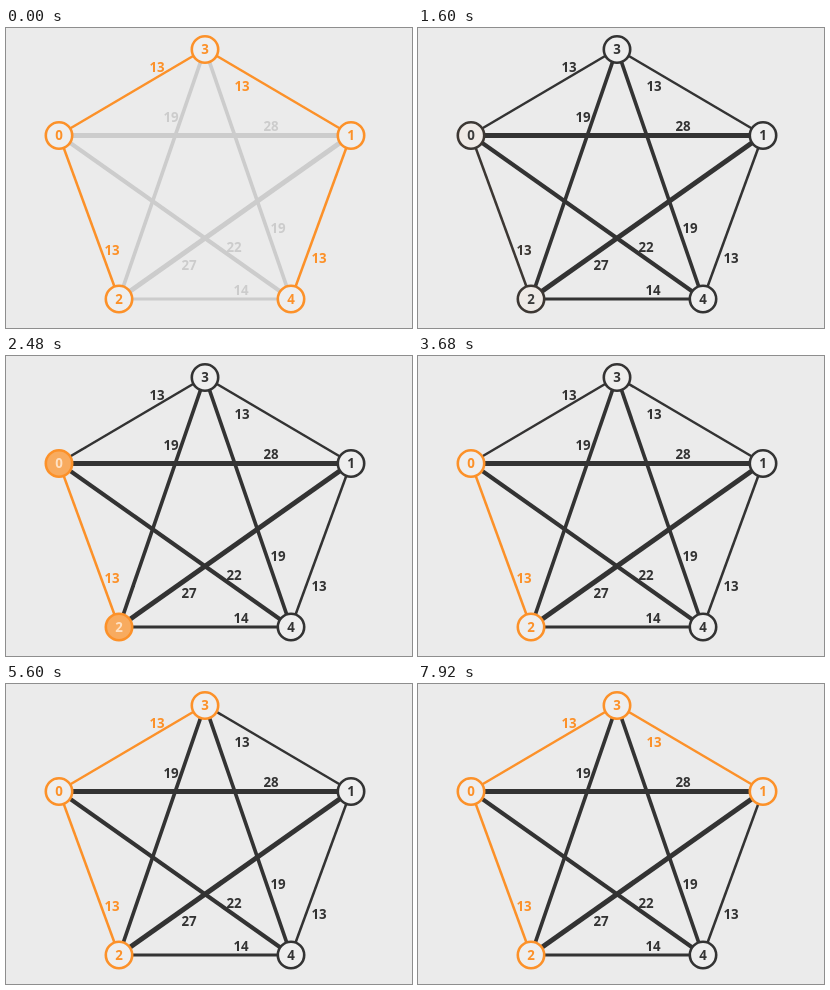
An HTML page for the animation above (8000 ms loop, 406 by 300 pixels).

```html
<!DOCTYPE html>
<html lang="en">
<head>
<meta charset="utf-8">
<title>Minimum spanning tree</title>
<style>
  @property --line { syntax: "<color>"; inherits: true; initial-value: #333; }
  @property --disc { syntax: "<color>"; inherits: true; initial-value: #eee; }
  @property --ink  { syntax: "<color>"; inherits: true; initial-value: #333; }

  :root { --hot: #fc9129; --dark: #333; --pale: #ccc; --paper: #eee; }
  html, body { margin: 0; width: 100%; height: 100%; overflow: hidden; background: #ebebeb; }
  svg { display: block; width: 406px; height: 300px; }

  line { stroke: var(--line); stroke-width: 2.5; }
  circle { r: 13.2px; fill: var(--disc); stroke: var(--line); stroke-width: 2.6; }
  text { font: bold 13.3px "Open Sans", "Noto Sans", sans-serif; text-anchor: middle; fill: var(--line); }
  .node text { fill: var(--ink); }

  .rest, .first, .second, .third, .last {
    animation: 8s cubic-bezier(.65, 0, .35, 1) infinite;
  }
  .rest   { animation-name: rest; }
  .first  { animation-name: first; }
  .second { animation-name: second; }
  .third  { animation-name: third; }
  .last   { animation-name: last; }

  /* The loop is eleven equal beats: reset, wait, then light up, settle, hold. */
  @keyframes rest {
    0% { --line: var(--pale); }
    3.25%, 100% { --line: var(--dark); }
  }
  @keyframes last {
    0% { --line: var(--hot); --disc: var(--paper); --ink: var(--hot); }
    3.25%, 100% { --line: var(--dark); --disc: var(--paper); --ink: var(--dark); }
  }
  @keyframes first {
    0% { --line: var(--hot); --disc: var(--paper); --ink: var(--hot); }
    3.25%, 18.18% { --line: var(--dark); --disc: var(--paper); --ink: var(--dark); }
    27.27% { --line: var(--hot); --disc: var(--hot); --ink: #fff; }
    36.36%, 100% { --line: var(--hot); --disc: var(--paper); --ink: var(--hot); }
  }
  @keyframes second {
    0% { --line: var(--hot); --disc: var(--paper); --ink: var(--hot); }
    3.25%, 45.45% { --line: var(--dark); --disc: var(--paper); --ink: var(--dark); }
    54.55% { --line: var(--hot); --disc: var(--hot); --ink: #fff; }
    63.64%, 100% { --line: var(--hot); --disc: var(--paper); --ink: var(--hot); }
  }
  @keyframes third {
    0% { --line: var(--hot); --disc: var(--paper); --ink: var(--hot); }
    3.25%, 72.73% { --line: var(--dark); --disc: var(--paper); --ink: var(--dark); }
    81.82% { --line: var(--hot); --disc: var(--hot); --ink: #fff; }
    90.91%, 100% { --line: var(--hot); --disc: var(--paper); --ink: var(--hot); }
  }
</style>
</head>
<body>
<svg viewBox="0 0 406 300">
  <g class="rest">
    <line x1="53" y1="107.5" x2="345" y2="107.5" style="stroke-width:5"/>
    <line x1="345" y1="107" x2="113" y2="271" style="stroke-width:5"/>
    <line x1="53" y1="107" x2="285" y2="271" style="stroke-width:4"/>
    <line x1="199" y1="21" x2="113" y2="271" style="stroke-width:3.7"/>
    <line x1="199" y1="21" x2="285" y2="271" style="stroke-width:3.7"/>
    <line x1="113" y1="271" x2="285" y2="271" style="stroke-width:2.8"/>
    <text x="265" y="103">28</text>
    <text x="183" y="242">27</text>
    <text x="228" y="224">22</text>
    <text x="165" y="94">19</text>
    <text x="272" y="205">19</text>
    <text x="235" y="267">14</text>
  </g>
  <g class="first">
    <line x1="53" y1="107" x2="113" y2="271"/>
    <text x="106" y="227">13</text>
  </g>
  <g class="second">
    <line x1="53" y1="107" x2="199" y2="21"/>
    <text x="151" y="44">13</text>
  </g>
  <g class="third">
    <line x1="199" y1="21" x2="345" y2="107"/>
    <text x="236" y="63">13</text>
  </g>
  <g class="last">
    <line x1="345" y1="107" x2="285" y2="271"/>
    <text x="313" y="235">13</text>
  </g>

  <g class="node first"><circle cx="53" cy="107.5"/><text x="53" y="112">0</text></g>
  <g class="node first"><circle cx="113" cy="271"/><text x="113" y="276">2</text></g>
  <g class="node second"><circle cx="199" cy="21.5"/><text x="199" y="26">3</text></g>
  <g class="node third"><circle cx="345" cy="107.5"/><text x="345" y="112">1</text></g>
  <g class="node last"><circle cx="285" cy="271"/><text x="285" y="276">4</text></g>
</svg>
</body>
</html>
```
